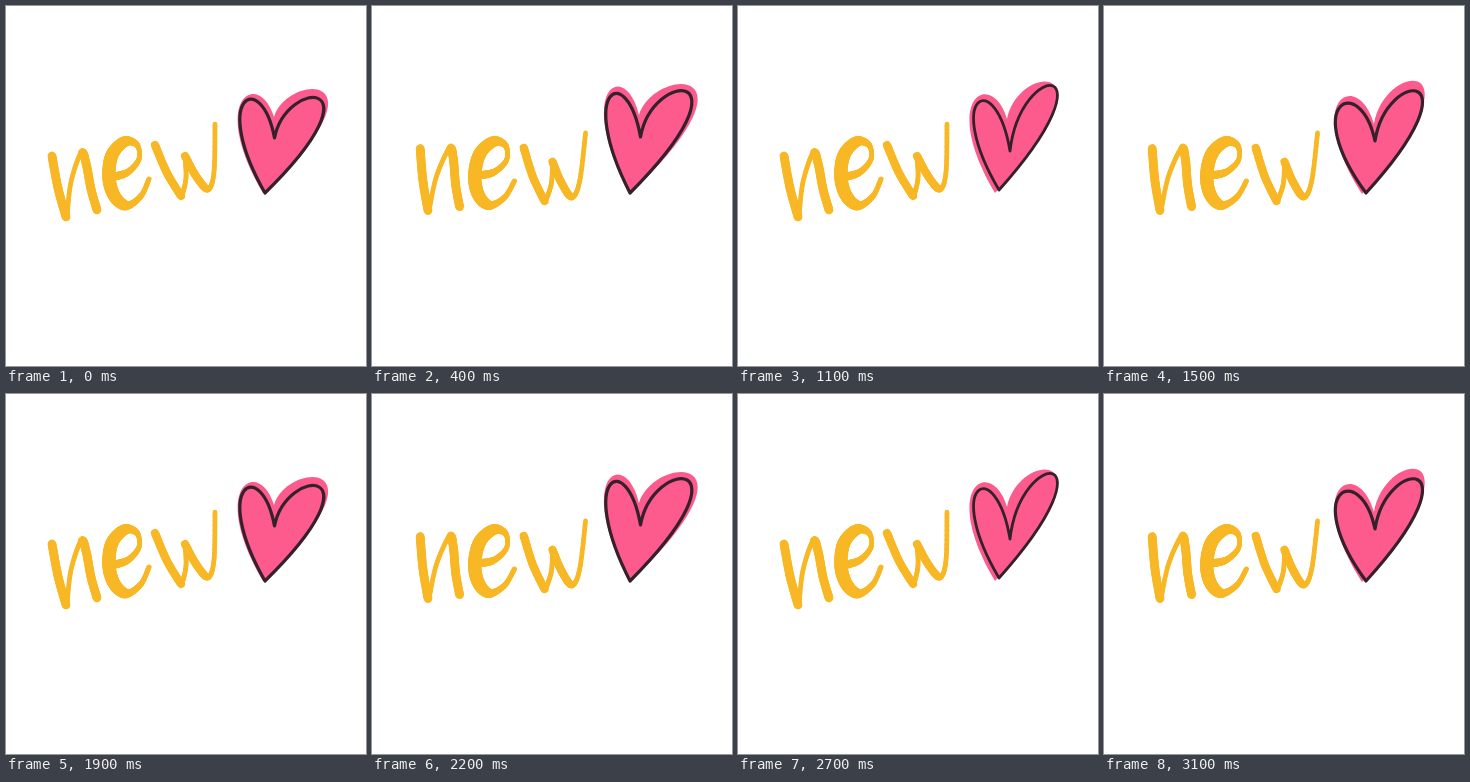
Animation of 360 by 360 pixels, one loop 3200 ms. Source, as an HTML page with a canvas:

```html
<!DOCTYPE html>
<html lang="en">
<head>
<meta charset="utf-8">
<title>new ♥</title>
<style>
html, body { margin: 0; width: 100%; height: 100%; overflow: hidden; background: #fff; }
canvas { display: block; width: 360px; height: 360px; }
</style>
</head>
<body>
<canvas id="stage"></canvas>
<script>
const canvas = document.getElementById('stage');
const ctx = canvas.getContext('2d');
const SIZE = 360, HOLD = 400;
const YELLOW = '#f8b725', PINK = '#fd5b8d', INK = '#35202b';
const TILT = 0.1, PIVOT = [122, 168];

// Letters as pen paths; downstrokes press harder than upstrokes.
const letters = {
  n: {
    width: 6.7, press: 2.1,
    strokes: [
      [[46, 150], [52, 182], [60, 211]],
      [[61, 211], [65, 176], [75, 147], [80, 157], [85, 183], [91, 204]]
    ]
  },
  e: {
    width: 9, press: 4.3,
    strokes: [
      [[107, 171], [122, 166], [133, 153], [131, 139], [119, 135.5], [106, 149],
       [103, 172], [109, 191], [121, 199.5], [135, 190], [143, 173]]
    ]
  },
  w: {
    width: 6.5, press: 1.8,
    strokes: [
      [[149, 139], [161, 167], [175, 190]],
      [[176, 190], [180, 172], [179, 150]],
      [[179, 150], [190, 170], [202, 183], [208, 166], [209, 118]]
    ]
  }
};

// Heart outlines: notch, left lobe, right lobe, tip.
const hearts = [
  { blob: [[268, 111], [236, 95], [317, 86], [257, 187]],
    line: [[268.5, 132], [238, 97], [313, 93], [259, 187]], width: 3.2 },
  { blob: [[267, 109], [236, 87], [320, 81], [258, 188]],
    line: [[268.5, 131], [238, 91], [315, 86], [258, 187]], width: 3.2 },
  { blob: [[269, 113], [236, 95], [315, 78], [257, 187]],
    line: [[272, 145], [240, 97], [315, 80], [261, 184]], width: 2.8 },
  { blob: [[270, 118], [235, 96], [316, 77], [258, 188]],
    line: [[271, 135], [236, 101], [314, 86], [262, 187]], width: 3.2 }
];

function spline(points, steps = 12) {
  const out = [points[0]];
  for (let i = 0; i < points.length - 1; i++) {
    const b = points[i], c = points[i + 1];
    const a = points[i - 1] || b, d = points[i + 2] || c;
    for (let s = 1; s <= steps; s++) {
      const t = s / steps;
      out.push(b.map((v, k) => v + t / 2 * (c[k] - a[k]
        + t * (2 * a[k] - 5 * v + 4 * c[k] - d[k]
        + t * (3 * v - a[k] - 3 * c[k] + d[k])))));
    }
  }
  return out;
}

function drawLetter({ width, press, strokes }) {
  for (const points of strokes) {
    const path = spline(points);
    for (let i = 1; i < path.length; i++) {
      const [x0, y0] = path[i - 1], [x, y] = path[i];
      ctx.lineWidth = width + press * Math.sin(Math.atan2(y - y0, x - x0));
      ctx.beginPath();
      ctx.moveTo(x0, y0);
      ctx.lineTo(x, y);
      ctx.stroke();
    }
  }
}

function drawWord(angle) {
  const [x, y] = PIVOT;
  ctx.save();
  ctx.translate(x, y);
  ctx.rotate(angle);
  ctx.translate(-x, -y);
  ctx.strokeStyle = YELLOW;
  Object.values(letters).forEach(drawLetter);
  ctx.restore();
}

// Control points of a cubic from notch to tip that passes the lobe halfway.
function lobeControls(notch, lobe, tip) {
  const dx = lobe[0] - (notch[0] + tip[0]) / 2;
  const spread = [dx, 9 - dx / 5];
  const mid = lobe.map((v, k) => (8 * v - notch[k] - tip[k]) / 6);
  return [
    mid.map((v, k) => v - spread[k]),
    mid.map((v, k) => v + spread[k])
  ];
}

function traceHeart([notch, left, right, tip]) {
  const [l1, l2] = lobeControls(notch, left, tip);
  const [r1, r2] = lobeControls(notch, right, tip);
  ctx.beginPath();
  ctx.moveTo(...notch);
  ctx.bezierCurveTo(...l1, ...l2, ...tip);
  ctx.bezierCurveTo(...r2, ...r1, ...notch);
  ctx.closePath();
}

function drawHeart({ blob, line, width }) {
  ctx.fillStyle = PINK;
  traceHeart(blob);
  ctx.fill();
  traceHeart(line);
  ctx.fill();
  ctx.strokeStyle = INK;
  ctx.lineWidth = width;
  ctx.stroke();
}

function draw(pose) {
  ctx.fillStyle = '#fff';
  ctx.fillRect(0, 0, SIZE, SIZE);
  drawWord(pose % 2 * TILT);
  drawHeart(hearts[pose]);
}

const ratio = window.devicePixelRatio || 1;
canvas.width = canvas.height = SIZE * ratio;
ctx.scale(ratio, ratio);
ctx.lineCap = ctx.lineJoin = 'round';

const start = performance.now();
function tick() {
  const time = Math.max(0, performance.now() - start);
  draw(Math.floor(time / HOLD) % hearts.length);
  requestAnimationFrame(tick);
}
tick();
</script>
</body>
</html>
```
